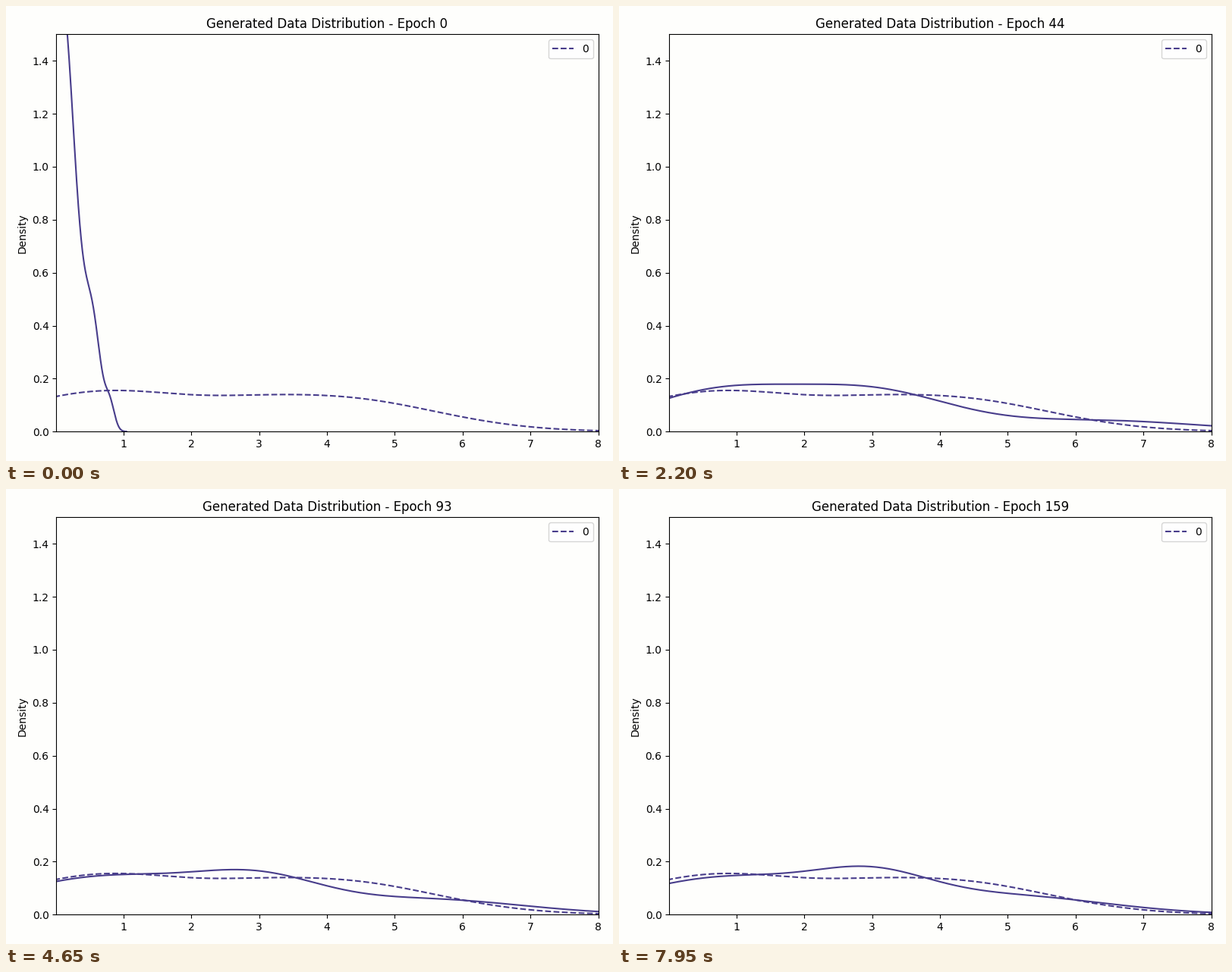
A matplotlib script that plays this animation: 800 px wide and 600 px high, repeating every 8 s.

```python
import numpy as np
import matplotlib.pyplot as plt
from matplotlib.animation import FuncAnimation

PAPER = "#fefefc"
INK = "darkslateblue"
EPOCHS = 160

plt.rcParams["font.family"] = "DejaVu Sans"

# a density is three normal bumps: rows of weight, mean, spread
REAL = np.array([(.509, .68, 1.38), (.021, 2.95, .7), (.454, 4.15, 1.45)])

# epoch, bumps reached by then, ease-out power of the way there
STAGES = [
    (0, [(.905, .07, .215), (.102, .55, .12), (.016, .8, .07)], 1),
    (28, [(.217, .97, .78), (.666, 2.35, 1.13), (.12, 5.2, .8)], 1.5),
    (44, [(.424, .72, 1.15), (.418, 3, 1.15), (.158, 6.3, 1.5)], 1),
    (72, [(.505, .65, 1.4), (.293, 3, 1), (.165, 5.8, 1.4)], 1),
    (159, [(.498, .85, 1.42), (.222, 3, .85), (.271, 4.9, 1.5)], 2),
]


def density(bumps):
    w, m, s = bumps.T
    x = np.linspace((m - 4 * s).min(), (m + 3.5 * s).max(), 500)
    z = (x[:, None] - m) / s
    return x, (w / (s * np.sqrt(2 * np.pi)) * np.exp(-z**2 / 2)).sum(axis=1)


def generated(epoch):
    for (t0, a, _), (t1, b, power) in zip(STAGES, STAGES[1:]):
        if epoch <= t1:
            u = 1 - (1 - (epoch - t0) / (t1 - t0)) ** power
            return (1 - u) * np.array(a) + u * np.array(b)


fig, ax = plt.subplots(figsize=(8, 6), dpi=100, facecolor=PAPER)
ax.set_facecolor(PAPER)
ax.plot(*density(REAL), "--", color=INK, label="0")
line, = ax.plot([], [], color=INK)
ax.set_xlim(.01, 8)
ax.set_ylim(0, 1.5)
ax.set_ylabel("Density")
title = ax.set_title("Generated Data Distribution - Epoch 0")
ax.legend(loc="upper right")
fig.tight_layout()


def update(epoch):
    line.set_data(*density(generated(epoch)))
    title.set_text(f"Generated Data Distribution - Epoch {epoch}")
    return line, title


anim = FuncAnimation(fig, update, frames=EPOCHS, interval=50,
                     repeat=True, repeat_delay=0)
plt.show()
```
